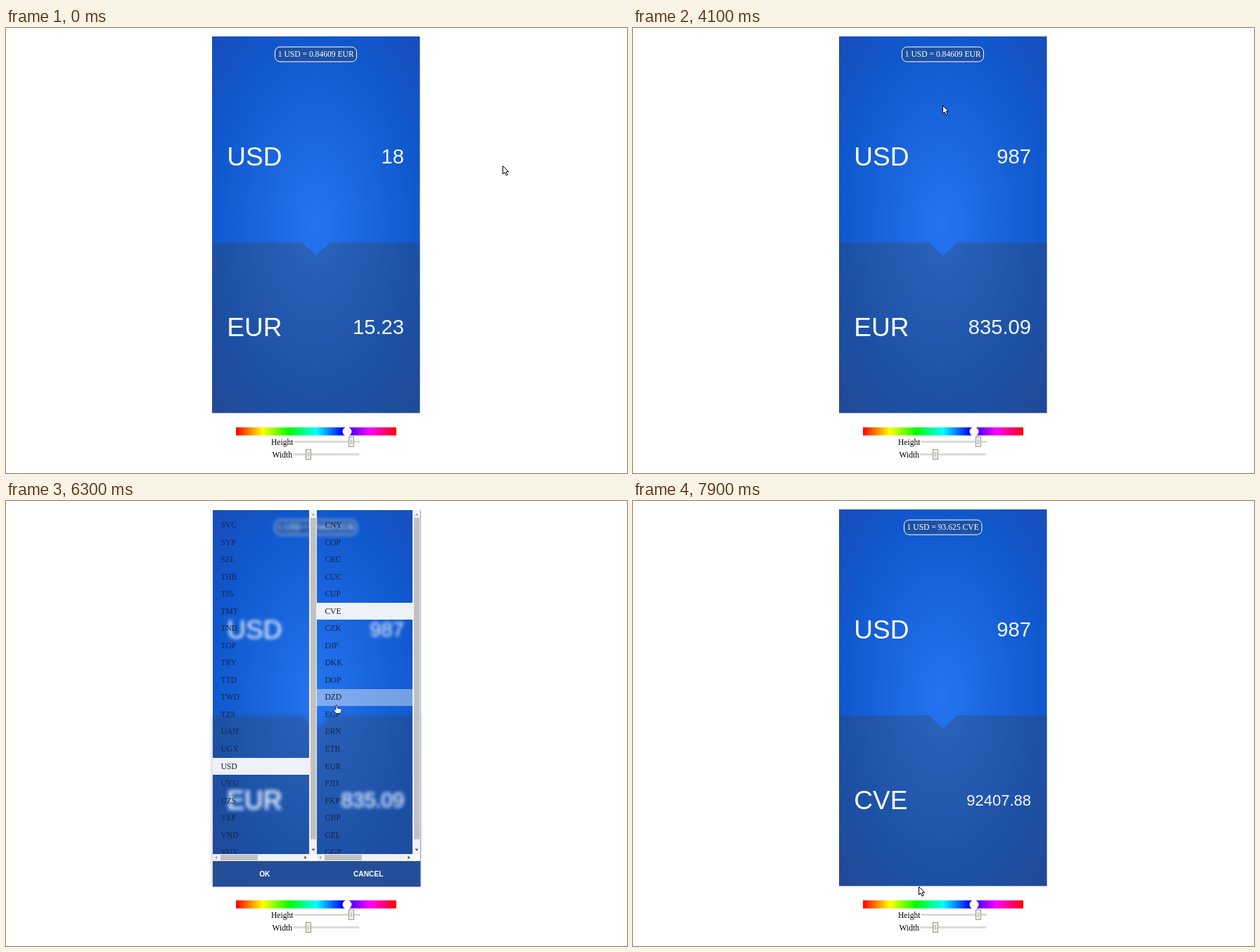
An HTML page that plays this animation: 883 px wide and 634 px high, repeating every 8000 ms.

```html
<!DOCTYPE html>
<html lang="en">
<head>
<meta charset="utf-8">
<title>Currency converter</title>
<style>
html, body { margin: 0; width: 100%; height: 100%; overflow: hidden; background: #fff; }
svg { display: block; }
text { font: 11.6px "Liberation Serif", "Times New Roman", serif; }
.code { font: 37px "Liberation Sans", Arial, sans-serif; fill: #fff; }
.num { font: 29.2px "Liberation Sans", Arial, sans-serif; fill: #f4f8ff; text-anchor: end; }
.btn { font: bold 10.2px "Liberation Sans", Arial, sans-serif; fill: #fff; text-anchor: middle; }
#pill text { fill: #fff; text-anchor: middle; }
#popup rect { shape-rendering: crispEdges; }
</style>
</head>
<body>
<svg width="883" height="634" viewBox="0 0 883 634">
  <defs>
    <radialGradient id="blue" gradientUnits="userSpaceOnUse" r="1" cx="0" cy="0" gradientTransform="translate(440.5 280) scale(209 379)">
      <stop offset="0" stop-color="#2574f0"/>
      <stop offset=".7" stop-color="#1058cd"/>
      <stop offset="1" stop-color="#194dba"/>
    </radialGradient>
    <linearGradient id="hues"></linearGradient>
    <filter id="blur" filterUnits="userSpaceOnUse" x="270" y="0" width="340" height="570"><feGaussianBlur stdDeviation="2.8"/></filter>
    <clipPath id="lists"><rect x="294" y="13" width="295" height="490"/></clipPath>
  </defs>

  <rect id="back" x="293" y="12" width="295.5" height="536.5" fill="url(#blue)"/>
  <g id="panel">
    <path d="M293 305.5H421L441 325L461 305.5H588.5V548.5H293Z" fill="#3c3c3c" fill-opacity=".285"/>
    <g id="pill">
      <rect id="frame" y="27" height="21" rx="7" fill="#3c3c3c" fill-opacity=".285" stroke="#fff"/>
      <text id="rate" x="440.7" y="41"></text>
    </g>
    <text class="code" x="314.3" y="196">USD</text>
    <text class="code" id="toCode" x="314.3" y="439"></text>
    <text class="num" id="from" x="566" y="193"></text>
    <text class="num" id="to" x="566"></text>
    <rect id="caret" x="565" y="167" width="1" height="32" fill="#fff"/>
  </g>

  <g id="popup">
    <g id="rows" clip-path="url(#lists)"></g>
    <g id="bars"></g>
    <rect x="294" y="513" width="295" height="36" fill="#254e99"/>
    <text class="btn" x="367.8" y="534.5">OK</text>
    <text class="btn" x="515.2" y="534.5">CANCEL</text>
  </g>

  <rect x="327" y="569" width="228" height="11.5" fill="url(#hues)"/>
  <circle cx="485" cy="575" r="6.5" fill="#fff"/>
  <text x="377" y="594">Height</text>
  <text x="378.5" y="612">Width</text>
  <g id="sliders"></g>

  <g id="cursor" stroke="#000" fill="#fff" stroke-linejoin="round">
    <path id="arrow" d="M.5 .5V12L3.2 9.6L5.2 14L7.2 13.1L5.2 8.8H8.6Z"/>
    <path id="hand" stroke="#12264f" stroke-width=".9" d="M-1 1Q0 -.3 1 1V5L6 6Q7 6.3 7 7.5V9L5.5 12.5H-1L-4 8Q-4 6.2 -2.6 6.8L-1 8Z"/>
  </g>
</svg>
<script>
const $ = id => document.getElementById(id);
const add = (parent, tag, attrs, text = '') => {
  const el = document.createElementNS('http://www.w3.org/2000/svg', tag);
  for (const k in attrs) el.setAttribute(k, attrs[k]);
  el.textContent = text;
  return parent.appendChild(el);
};
const box = (parent, x, y, width, height, fill) => add(parent, 'rect', { x, y, width, height, fill });

const LOOP = 8000, TICK = 100, OPEN = 5100, PICK = 6000, CLOSE = 7200;
const ROW = 24.54, TOP = 22.2, BAR = 11;

// Time, x, y of the pointer's hot spot
const path = [
  [0, 706, 196], [3800, 706, 196], [3900, 660, 180], [4000, 540, 140], [4100, 440, 110],
  [4700, 418, 30.5], [5200, 418, 30.5], [5300, 423, 33], [5400, 437, 62], [5500, 468, 120],
  [5600, 494, 152], [5700, 499, 156], [6000, 499, 156], [6100, 497, 172], [6300, 470, 290],
  [6400, 437, 370], [6500, 408, 435], [6600, 388, 470], [6700, 376, 484], [6800, 368, 514],
  [6900, 367, 523], [7700, 367, 523], [7800, 390, 537], [7900, 406, 549], [8000, 406, 549]
];
const typed = [[0, '18'], [800, '1'], [1500, ''], [2200, '9'], [2600, '98'], [3100, '987']];
const caretOn = [[300, 900], [1500, 2100], [2200, 3700], [4300, 4900], [7300, 7900]];

function pointer(t) {
  const i = path.findIndex(p => p[0] > t);
  const [t0, x0, y0] = path[i - 1], [t1, x1, y1] = path[i];
  const k = (t - t0) / (t1 - t0);
  return { x: x0 + (x1 - x0) * k, y: y0 + (y1 - y0) * k };
}

// Hue bar and sliders
['#f00', '#ff0', '#0f0', '#0ff', '#00f', '#f0f', '#f00'].forEach((c, i) =>
  add($('hues'), 'stop', { offset: i / 6, 'stop-color': c }));
for (const [x, y, thumb] of [[410, 589, 487.5], [408.5, 607, 426.5]]) {
  box($('sliders'), x, y - 1, 93.5, 3, '#dadada');
  add($('sliders'), 'rect', { x: thumb, y: y - 6.5, width: 7, height: 14, fill: '#eeeee8', stroke: '#98988e' });
  for (const d of [-2, 0, 2]) box($('sliders'), thumb + 2, y + d, 3, 1, '#aaa');
}

// Currency lists with their scrollbars
const columns = [
  { x: 294, w: 137, selected: () => 15, codes: 'STD SVC SYP SZL THB TJS TMT TND TOP TRY TTD TWD TZS UAH UGX USD UYU UZS VEF VND VUV' },
  { x: 442, w: 136, selected: t => t < PICK ? 15 : 6, codes: 'CLP CNY COP CRC CUC CUP CVE CZK DJF DKK DOP DZD EGP ERN ETB EUR FJD FKP GBP GEL GGP' }
];
for (const c of columns) {
  const bars = $('bars'), end = c.x + c.w;
  const tri = (d, fill = '#505050') => add(bars, 'path', { d, fill });
  c.rows = c.codes.split(' ').map((code, i) => {
    const y = TOP + (i - 1) * ROW;
    const bg = box($('rows'), c.x, y, c.w, ROW, '#eef1f6');
    const label = add($('rows'), 'text', { x: c.x + 11.4, y: y + 15.8 }, code);
    return { bg, label };
  });
  box(bars, end, 13, BAR, 490, '#f1f1f1');
  c.thumb = box(bars, end + 2, 24, 8, 458, '#c1c1c1');
  box(bars, c.x, 503, c.w, 10, '#f1f1f1');
  box(bars, end, 503, BAR, 10, '#fff');
  box(bars, c.x + 11, 504, 53, 8, '#c1c1c1');
  tri(`M${end + 3.5} 20.5h5l-2.5 -3z`, '#a3a3a3');
  tri(`M${end + 3.5} 495.5h5l-2.5 3z`);
  tri(`M${c.x + 6} 505.5v5l-3 -2.5z`, '#a3a3a3');
  tri(`M${end - 6.5} 505.5v5l3 -2.5z`);
}

// Row highlights ease towards their state, replayed from the opening
function highlights(col, t) {
  const level = col.rows.map((_, i) => +(i === col.selected(OPEN)));
  for (let s = OPEN + 200; s <= t; s += TICK) {
    const { x, y } = pointer(s);
    const inside = x >= col.x && x < col.x + col.w && y < 503;
    const hovered = inside ? Math.floor((y - TOP) / ROW) + 1 : -1;
    level.forEach((v, i) => {
      const on = i === hovered || i === col.selected(s);
      level[i] = Math.min(1, Math.max(0, v + (on ? .45 : -.45)));
    });
  }
  return level;
}

function drawPopup(t, p) {
  for (const c of columns) {
    highlights(c, t).forEach((v, i) => {
      c.rows[i].bg.setAttribute('opacity', v);
      c.rows[i].label.setAttribute('fill', v > .3 ? '#1a1d2c' : '#14264f');
    });
    const end = c.x + c.w;
    const over = p.x >= end && p.x < end + BAR && p.y < 482;
    c.thumb.setAttribute('fill', over ? '#a8a8a8' : '#c1c1c1');
  }
}

function draw(t) {
  t = Math.floor(t / TICK) * TICK;
  const open = t >= OPEN && t < CLOSE, changed = t >= CLOSE;
  const code = changed ? 'CVE' : 'EUR', rate = changed ? 93.625 : 0.84609;
  const from = typed.filter(k => k[0] <= t).pop()[1];
  const to = from ? (from * rate).toFixed(2) : '0';
  const long = to.length > 7;

  $('rate').textContent = `1 USD = ${rate} ${code}`;
  $('frame').setAttribute('x', changed ? 385.5 : 382.5);
  $('frame').setAttribute('width', changed ? 110.5 : 116);
  $('toCode').textContent = code;
  $('from').textContent = from;
  $('to').textContent = to;
  $('to').style.fontSize = long ? '22px' : '';
  $('to').setAttribute('y', long ? 434 : 436);
  const blink = caretOn.some(([a, b]) => t >= a && t < b);
  $('caret').style.display = blink ? '' : 'none';

  const p = pointer(t);
  $('back').setAttribute('transform', open ? 'translate(1 1)' : '');
  $('panel').setAttribute('filter', open ? 'url(#blur)' : 'none');
  $('popup').style.display = open ? '' : 'none';
  if (open) drawPopup(t, p);

  const hand = open || (t >= 4600 && t < OPEN);
  $('cursor').setAttribute('transform', `translate(${p.x} ${p.y})`);
  $('hand').style.display = hand ? '' : 'none';
  $('arrow').style.display = hand ? 'none' : '';
}

const start = performance.now();
function frame() {
  draw((performance.now() - start) % LOOP);
  requestAnimationFrame(frame);
}
frame();
</script>
</body>
</html>
```
